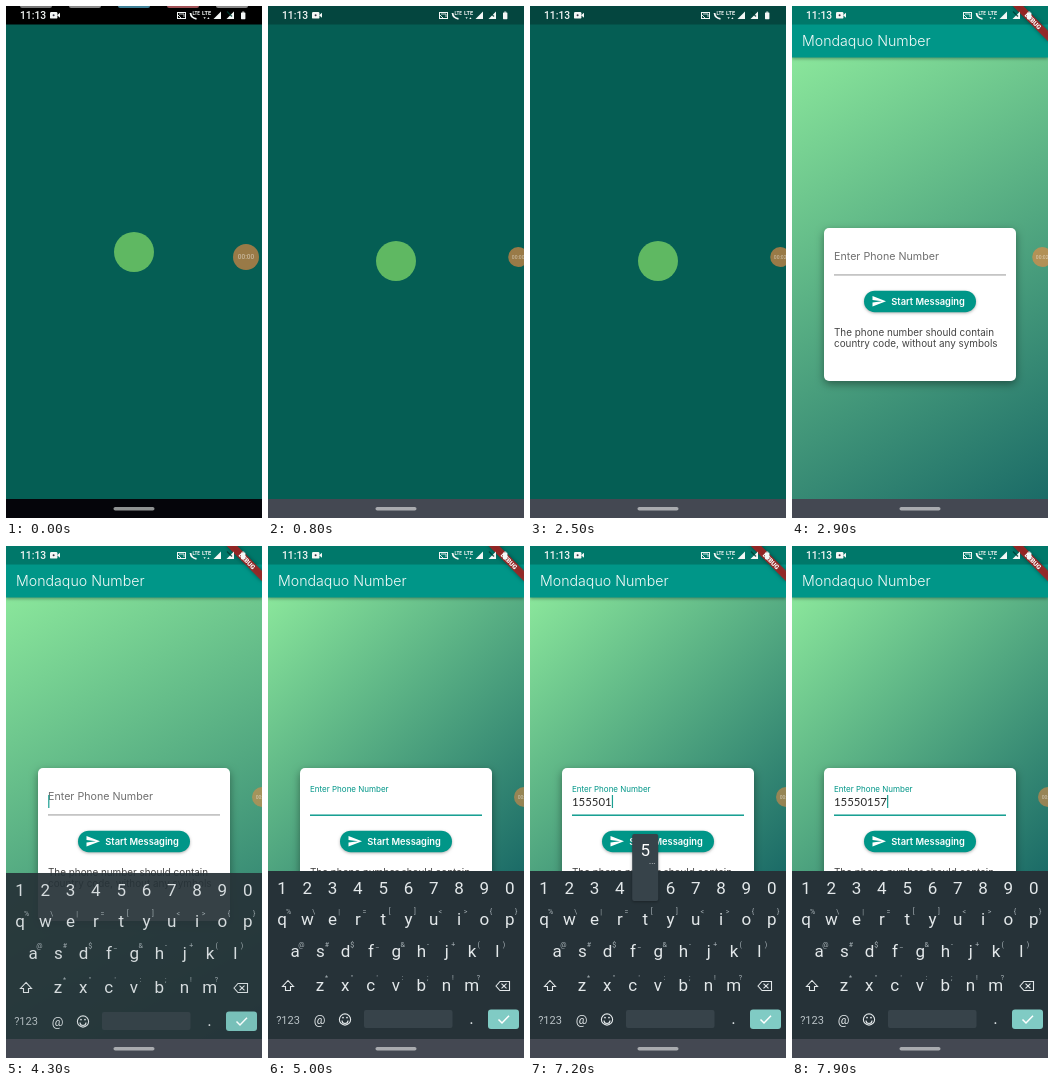
An HTML page with a canvas that plays this animation: 256x512 px, repeating every 8000 ms.

```html
<!DOCTYPE html>
<html lang="en">
<head>
<meta charset="utf-8">
<title>Phone number entry</title>
<style>
html, body { margin: 0; width: 100%; height: 100%; overflow: hidden; background: #000; }
canvas { display: block; width: 100vw; height: 100vh; }
</style>
</head>
<body>
<canvas id="stage"></canvas>
<script>
const W = 256, H = 512, LOOP = 8000;
const TEAL = '#009688';
const INTER = 'Inter, "Open Sans", sans-serif';
const LATO = 'Lato, "Open Sans", sans-serif';
const ROBOTO = 'Roboto, "Noto Sans", sans-serif';

const SWAP = 800, APP = 2900, FOCUS = 4200, RESIZE = 4400;
const NAV_TOP = 493;
const NUMBER = '15550157';
const PRESSES = [5200, 5450, 5700, 6150, 6500, 6850, 7150, 7710];
const HOLD = 180;

const canvas = document.getElementById('stage');
const dpr = window.devicePixelRatio || 1;
canvas.width = W * dpr;
canvas.height = H * dpr;
const c = canvas.getContext('2d');

const clamp = v => Math.max(0, Math.min(1, v));
const span = (t, a, b) => clamp((t - a) / (b - a));
const ease = p => p * p * (3 - 2 * p);
const mix = (a, b, p) => a + (b - a) * p;

function rect(x, y, w, h, color) {
  c.fillStyle = color;
  c.fillRect(x, y, w, h);
}

function round(x, y, w, h, r, color) {
  c.beginPath();
  c.roundRect(x, y, w, h, r);
  c.fillStyle = color;
  c.fill();
}

function disc(x, y, r, color) {
  c.beginPath();
  c.arc(x, y, r, 0, Math.PI * 2);
  c.fillStyle = color;
  c.fill();
}

function path(points, close) {
  c.beginPath();
  points.forEach(([x, y], i) => i ? c.lineTo(x, y) : c.moveTo(x, y));
  if (close) c.closePath();
}

function poly(points, color) {
  path(points, true);
  c.fillStyle = color;
  c.fill();
}

function line(points, color, width, close) {
  path(points, close);
  c.strokeStyle = color;
  c.lineWidth = width;
  c.stroke();
}

function text(str, x, y, font, color, align = 'left') {
  c.font = font;
  c.fillStyle = color;
  c.textAlign = align;
  c.fillText(str, x, y);
}

function withShadow(alpha, blur, dy, draw) {
  c.save();
  c.shadowColor = `rgba(0,0,0,${alpha})`;
  c.shadowBlur = blur * dpr;
  c.shadowOffsetY = dy * dpr;
  draw();
  c.restore();
}

function statusIcons() {
  const white = '#f4f7f6';
  text('11:13', 14, 13, `500 10.3px ${ROBOTO}`, white);
  round(44, 6, 7.4, 6.6, 1.2, white);
  poly([[51, 9.3], [54, 6.8], [54, 11.8]], white);
  disc(47.6, 9.3, 1, '#334');

  c.strokeStyle = white;
  c.lineWidth = 1;
  c.strokeRect(171.5, 6.5, 8, 6);
  line([[173, 8], [178, 8], [178, 11]], white, .8);
  line([[172, 9], [175.5, 12.5]], white, .9);

  c.lineWidth = 1.8;
  c.beginPath();
  c.moveTo(184.5, 7);
  c.quadraticCurveTo(185, 12, 190.5, 12.8);
  c.stroke();
  text('LTE', 186.5, 8.6, `700 4.6px ${ROBOTO}`, white);
  text('LTE', 196, 9.2, `700 5.6px ${ROBOTO}`, white);
  poly([[197.5, 11.3], [199.7, 11.3], [198.6, 13]], white);
  poly([[201.3, 13], [203.5, 13], [202.4, 11.3]], white);

  poly([[207.5, 13], [215, 13], [215, 5.5]], white);
  poly([[220.5, 13], [228, 13], [228, 5.5]], white);
  line([[221, 5.5], [226, 10.5]], 'rgba(0,60,50,.8)', 1.4);
  round(235, 6.5, 4.4, 6.7, .6, white);
  rect(236.2, 5.6, 2, 1, white);
}

function navBar(black) {
  rect(0, NAV_TOP, W, H - NAV_TOP, black ? '#05050a' : '#444852');
  round(107.5, 501, 41, 3.6, 1.8, black ? '#8f9292' : '#a9abaf');
}

function bubble(t) {
  const dock = ease(span(t, 100, 400));
  const x = 240 + 10.2 * dock + 5.8 * ease(span(t, 3950, 4100));
  const r = mix(13, 10, dock);
  c.save();
  c.globalAlpha = t < 4000 ? .64 : .55;
  disc(x, 251, r, '#ee8a40');
  c.globalAlpha = .45;
  const secs = Math.floor(t / 1000);
  text('00:0' + secs, x, 253, `500 ${r / 2}px ${ROBOTO}`, '#fff', 'center');
  c.restore();
}

function splash(t) {
  const swapped = t >= SWAP;
  rect(0, 0, W, H, '#055e54');
  rect(0, 0, W, 18.5, swapped ? '#04463f' : '#000');
  if (t < 200) {
    ['#777', '#888', '#3c7f96', '#a05055', '#888']
      .forEach((color, i) => round(14 + i * 49, -2, 32, 4, 2, color));
  }
  disc(128, swapped ? 255 : 246, 20, '#5fb862');
  navBar(!swapped);
}

function debugBanner() {
  const s = W / 411;
  c.save();
  c.translate(W, 0);
  c.rotate(Math.PI / 4);
  withShadow(.5, 4, 0, () => rect(-40 * s, 28 * s, 80 * s, 12 * s, 'rgba(183,28,28,.8)'));
  text('DEBUG', 0, 37.6 * s, `900 ${10.2 * s}px ${ROBOTO}`, '#fff', 'center');
  c.restore();
}

function typedCount(t) {
  return PRESSES.filter(p => t >= p + HOLD).length;
}

function field(t) {
  const p = ease(span(t, 4310, 4510));
  const grey = [112, 112, 112], accent = [0, 150, 136];
  const color = `rgb(${grey.map((g, i) => Math.round(mix(g, accent[i], p)))})`;
  text('Enter Phone Number', 42, mix(254, 246, p), `${mix(10.7, 8, p)}px ${INTER}`, color);
  rect(42, 268.5, 172, mix(.9, 1.4, p), p > 0 ? TEAL : '#8c8c8c');

  if (t < FOCUS) return;
  const n = typedCount(t);
  const typed = NUMBER.slice(0, n);
  text(typed, 42, 259.7, `11.4px ${LATO}`, '#2b2b2b');
  const since = t - (n ? PRESSES[n - 1] + HOLD : FOCUS);
  if (since % 1000 < 560) {
    rect(42.2 + c.measureText(typed).width, 249, 1.2, 13, '#1b9f92');
  }
}

function card(t) {
  withShadow(.4, 8, 3, () => round(32, 222, 192, 153, 5, '#fff'));
  field(t);
  withShadow(.3, 3, 1, () => round(72, 284.7, 112, 21.5, 10.75, TEAL));
  poly([[80.5, 290], [94, 295.3], [80.5, 300.6], [80.5, 296.5], [90, 295.3], [80.5, 294.1]], '#fff');
  text('Start Messaging', 99.3, 298.6, `600 9.3px ${INTER}`, '#fff');
  text('The phone number should contain', 42, 330, `9.9px ${INTER}`, '#444');
  text('country code, without any symbols', 42, 341, `9.9px ${INTER}`, '#444');
}

function app(t) {
  const bottom = t < RESIZE ? NAV_TOP : 325;
  const g = c.createLinearGradient(0, 52, W, bottom);
  g.addColorStop(0, '#8ae69b');
  g.addColorStop(1, '#1b6b67');
  rect(0, 51, W, bottom - 51, g);
  c.save();
  c.beginPath();
  c.rect(0, 51, W, bottom - 51);
  c.clip();
  card(t);
  c.restore();
  withShadow(.3, 3, 1, () => rect(0, 18, W, 33.5, TEAL));
  rect(0, 0, W, 18.5, '#00786a');
  text('Mondaquo Number', 10, 40.3, `300 14.2px ${INTER}`, '#f5fbfa');
  debugBanner();
}

const KEY = '#e3e8ea', HINT = '#a9b3b8';
const ROWS = [
  ['1234567890', '', 14, 342.5],
  ['qwertyuiop', '%\\|=[]<>{}', 14, 373],
  ['asdfghjkl', '@#$_&-+()', 27, 405.5],
  ['zxcvbnm', '*"\':;!?', 52, 439]
];
const PITCH = 25.3;

function keyIcons() {
  line([[20, 434.5], [25.5, 440.5], [22.5, 440.5], [22.5, 444.5], [17.5, 444.5], [17.5, 440.5], [14.5, 440.5]], KEY, 1.1, true);
  line([[228, 440], [232, 435.5], [241.5, 435.5], [241.5, 444.5], [232, 444.5]], KEY, 1.1, true);
  line([[233.5, 437.6], [238.5, 442.4]], KEY, 1.1);
  line([[238.5, 437.6], [233.5, 442.4]], KEY, 1.1);

  text('?123', 20, 477.5, `11px ${ROBOTO}`, '#b9c2c6', 'center');
  text('@', 51.5, 478, `13px ${ROBOTO}`, KEY, 'center');
  c.beginPath();
  c.arc(77, 473.5, 5.6, 0, Math.PI * 2);
  c.moveTo(80, 474.5);
  c.arc(77, 474.5, 3, 0, Math.PI);
  c.strokeStyle = KEY;
  c.lineWidth = 1.1;
  c.stroke();
  disc(75, 471.6, .9, KEY);
  disc(79, 471.6, .9, KEY);

  round(96, 464, 88.5, 18, 2, '#37434a');
  text('.', 203.5, 478, `17px ${ROBOTO}`, KEY, 'center');
  round(220, 463.5, 31, 19.5, 3, '#80cbc4');
  line([[230.5, 473.5], [234, 477], [241, 469.8]], '#fff', 1.5);
}

function popup(t) {
  const i = PRESSES.findIndex(p => t >= p && t < p + HOLD);
  if (i < 0) return;
  const digit = NUMBER[i];
  const x = 14 + '1234567890'.indexOf(digit) * PITCH;
  withShadow(.3, 3, 1, () => round(x - 13, 288, 26, 67, 2, '#37434a'));
  text(digit, x, 310, `17px ${ROBOTO}`, '#fff', 'center');
  text('...', x + 7, 317.5, `8px ${ROBOTO}`, '#fff', 'center');
}

function keyboard(t) {
  const k = span(t, FOCUS, FOCUS + 130);
  c.save();
  c.beginPath();
  c.rect(0, 0, W, NAV_TOP);
  c.clip();
  c.globalAlpha = Math.min(1, .5 + k * .55);
  c.translate(0, 40 * (1 - k) ** 2);
  rect(0, 325, W, 170, '#263238');
  for (const [keys, hints, x0, y] of ROWS) {
    [...keys].forEach((key, i) => {
      const x = x0 + i * PITCH;
      text(key, x, y + 5.8, `17px ${ROBOTO}`, KEY, 'center');
      if (hints) text(hints[i], x + 6.5, y - 5, `7px ${ROBOTO}`, HINT, 'center');
    });
  }
  keyIcons();
  popup(t);
  c.restore();
}

function draw(t) {
  c.setTransform(dpr, 0, 0, dpr, 0, 0);
  if (t < APP) {
    splash(t);
  } else {
    app(t);
    navBar(false);
    if (t > FOCUS) keyboard(t);
  }
  statusIcons();
  bubble(t);
}

const start = performance.now();
function tick() {
  draw((performance.now() - start) % LOOP);
  requestAnimationFrame(tick);
}
tick();
</script>
</body>
</html>
```
